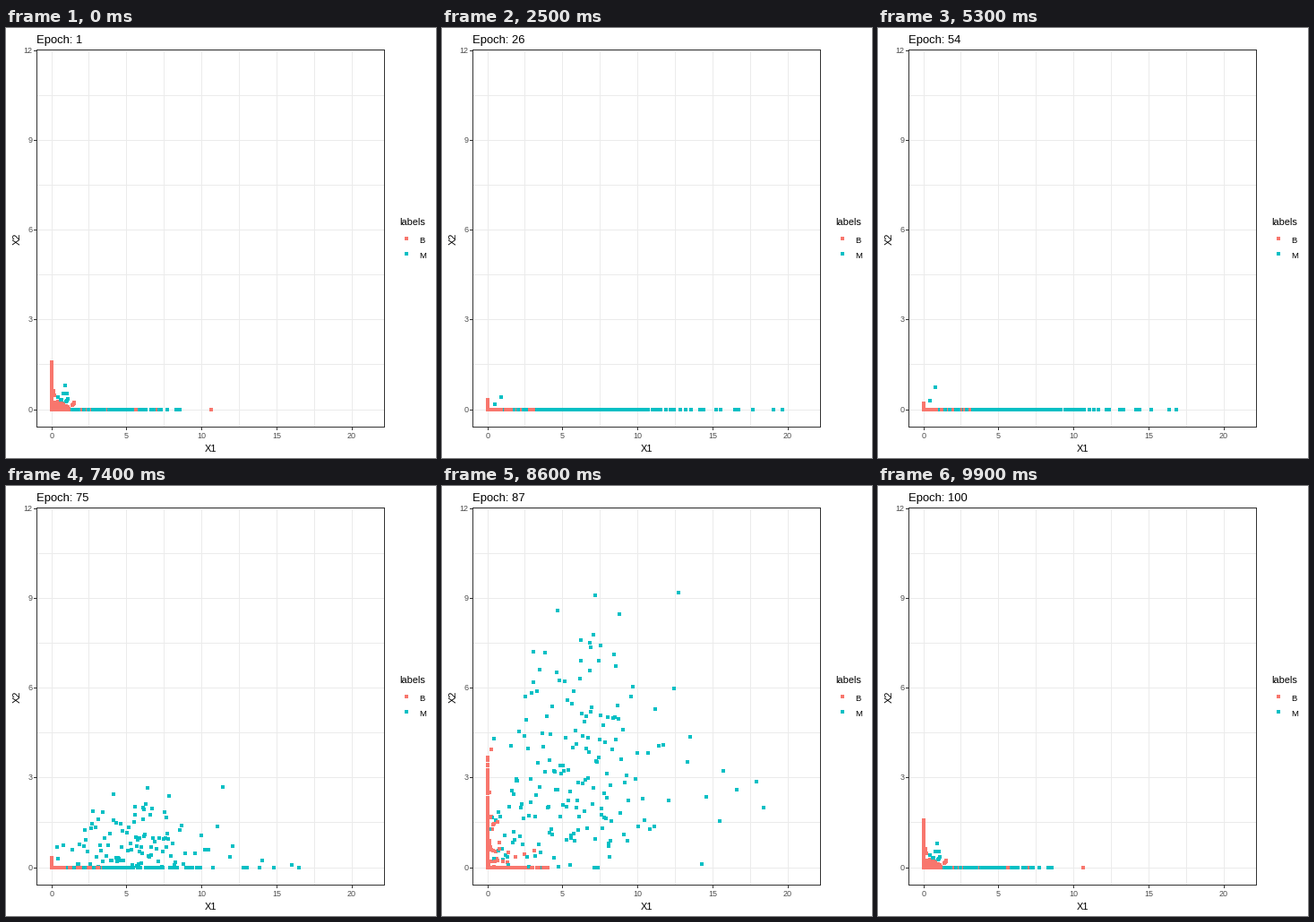
A matplotlib script for the animation above (10000 ms loop, 480 px wide and 480 px high).

```python
import numpy as np
import matplotlib.pyplot as plt
from matplotlib.animation import FuncAnimation
from matplotlib.patches import Rectangle

SIZE, DPI, EPOCHS = 480, 100, 100
PT = 72 / DPI
RED, TEAL = "#F8766D", "#00BFC4"
X0, XS, Y0, YS = 51, 16.78, 426, 33.4
LEFT, RIGHT, TOP, BOTTOM = 34, 422, 24, 445

plt.rcParams["font.family"] = "Liberation Sans"
rng = np.random.default_rng(7)


def curve(**keys):
    """Piecewise linear function of the epoch from keys such as e14=2."""
    t = [int(k[1:]) for k in keys]
    v = list(keys.values())
    return lambda epoch: np.interp(epoch, t, v)


def spread(n):
    """n ordered fractions in 0..1 with a little jitter."""
    return (np.arange(n) + rng.uniform(0, 1, n)) / n


# Class M: reach along X1, then a lift along X2 that passes through a ReLU
reach = curve(e1=8.7, e5=15, e10=20.4, e14=20.5, e18=21, e38=18.6,
              e54=17.2, e61=18.4, e75=16.8, e87=18.8, e99=19.7)
bend = curve(e1=.5, e14=.75)
slope = curve(e54=2, e75=4, e87=9.7, e99=11.9)
bias = curve(e54=2, e75=1.3, e87=.5)
stray = curve(e1=.8, e14=.37, e38=.48, e54=.75)

# Class B: a column on X2, a row on X1 and a haze near the corner
height = curve(e1=1.6, e14=.4, e38=.25, e54=.2, e75=.35, e87=3.75, e99=4.5)
column_pow = curve(e1=1.05, e14=4.5)
width = curve(e1=3.6, e14=3.2, e75=3.4, e87=4)
row_pow = curve(e1=1.6, e14=2.5, e40=5)
fade = curve(e1=1, e5=.4, e13=0)
lift = curve(e77=0, e87=1, e99=1.2)

m = spread(200)
climb = rng.beta(1.8, 3, m.size) * np.clip(.5 + 2 * m, 0, 1)
climb /= climb.max()
m_start = np.where(m < .06, rng.uniform(.1, .6, m.size), 0)
m_stray = np.zeros(m.size)
m_stray[[3, 7]] = .4, 1

col = spread(150)
row = spread(120)
row[-1] = 1
row_lift = np.where(np.arange(row.size) % 6 == 0, rng.exponential(.6, row.size), 0)
haze = np.minimum(rng.exponential(.45, 65), 1.5)
haze_start = rng.uniform(0, .27, haze.size)
haze_start[::13] *= 2.3
haze_lift = np.where(np.arange(haze.size) % 3 == 0, rng.exponential(.9, haze.size), 0)

COLORS = np.repeat([RED, TEAL], [col.size + row.size + haze.size, m.size])
order = rng.permutation(COLORS.size)


def cloud(t):
    mx = reach(t) * (.52 * m ** bend(t) + .48 * m ** 20)
    my = np.maximum(slope(t) * climb - bias(t), m_start * fade(t))
    my = np.maximum(my, m_stray * stray(t))

    row_x = width(t) * row ** row_pow(t) + 7 * fade(t) * row ** 70
    haze_x = haze * (.5 + .5 * max(fade(t), lift(t)))
    haze_y = haze_start * fade(t) + haze_lift * lift(t)

    x = np.concatenate([0 * col, row_x, haze_x, mx])
    y = np.concatenate([height(t) * col ** column_pow(t), row_lift * lift(t), haze_y, my])
    xy = np.column_stack([X0 + XS * x, Y0 - YS * np.maximum(y, 0)])
    return np.round(xy)[order]


fig = plt.figure(figsize=(SIZE / DPI, SIZE / DPI), dpi=DPI, facecolor="white")
ax = fig.add_axes([0, 0, 1, 1])
ax.set(xlim=(0, SIZE), ylim=(SIZE, 0))
ax.axis("off")


def line(xs, ys, color):
    ax.plot(xs, ys, color=color, lw=PT, antialiased=False, solid_capstyle="butt", zorder=1)


def label(x, y, text, size, color="black", **kw):
    return ax.text(x, y, text, fontsize=size * PT, color=color, **kw)


def dots(xy, colors):
    x, y = np.transpose(xy)
    return ax.scatter(x, y, s=(4 * PT) ** 2, c=colors, linewidths=0,
                      antialiased=False, zorder=3)


for v in np.arange(0, 22.5, 2.5):
    x = int(X0 + XS * v)
    line([x, x], [TOP, BOTTOM], "#EBEBEB")
    if v % 5 == 0:
        line([x, x], [BOTTOM, BOTTOM + 3], "#333333")
        label(x, 458.5, f"{v:.0f}", 9, "#4D4D4D", ha="center")
for v in np.arange(0, 12.1, 1.5):
    y = int(Y0 - YS * v)
    line([LEFT, RIGHT], [y, y], "#EBEBEB")
    if v % 3 == 0:
        line([LEFT - 3, LEFT], [y, y], "#333333")
        label(29.5, y + 3.4, f"{v:.0f}", 9, "#4D4D4D", ha="right")

ax.add_patch(Rectangle((LEFT, TOP), RIGHT - LEFT, BOTTOM - TOP, fill=False,
                       ec="#333333", lw=PT, antialiased=False, zorder=4))
label(228, 473, "X1", 11, ha="center")
label(15.5, 235.5, "X2", 11, ha="center", rotation=90, rotation_mode="anchor")
label(439, 220, "labels", 11)
label(461.5, 240, "B", 9.5)
label(461.5, 257, "M", 9.5)
dots([(447, 235), (447, 252)], [RED, TEAL])

title = label(34, 17, "", 13)
points = dots(cloud(1), COLORS[order])


def draw(i):
    epoch = i + 1
    title.set_text(f"Epoch: {epoch}")
    # the last step snaps back to the starting layout
    points.set_offsets(cloud(epoch if epoch < EPOCHS else 1))
    return title, points


anim = FuncAnimation(fig, draw, frames=EPOCHS, interval=100, repeat=True, repeat_delay=0)
plt.show()
```
